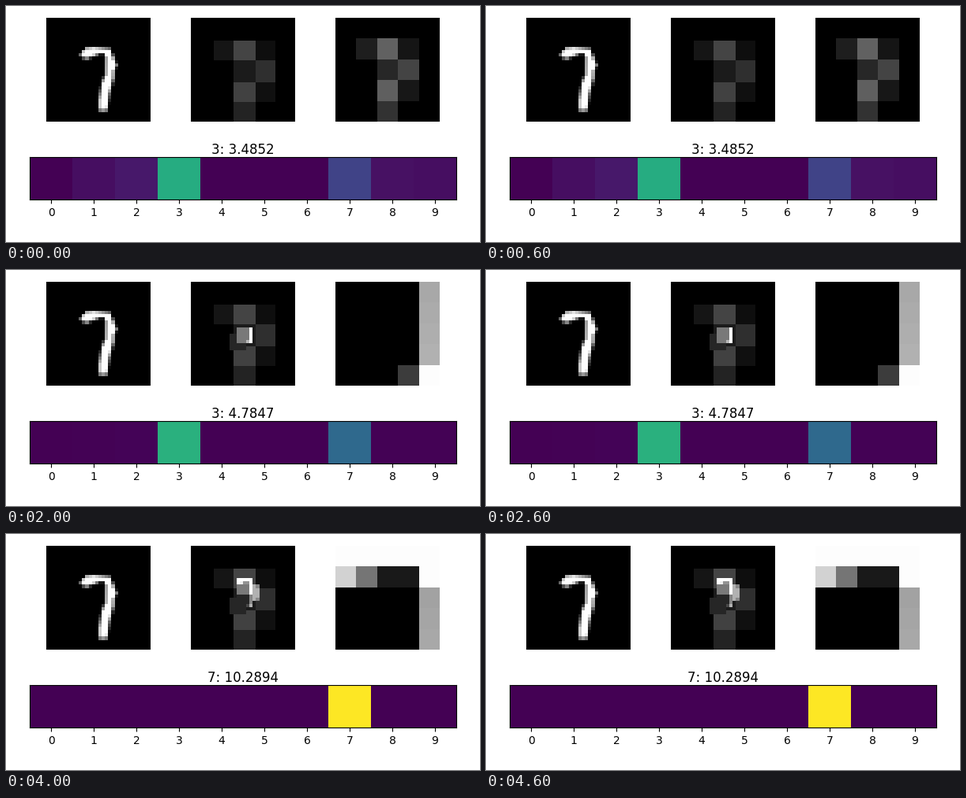
Animation, 600 px wide and 300 px high, one loop 5000 ms. Source, as a matplotlib script:

```python
import numpy as np
import matplotlib.pyplot as plt
from matplotlib.animation import FuncAnimation

SIZE, GLIMPSE = 32, 5
cell = np.arange(SIZE)


def coverage(lo, hi):
    """Share of each unit cell between lo and hi, one row per pair of edges."""
    lo, hi = np.reshape(lo, (-1, 1)), np.reshape(hi, (-1, 1))
    return np.clip(np.minimum(hi, cell + 1) - np.maximum(lo, cell), 0, 1)


def band(start, end, lo, hi):
    """Stroke running along the first axis, its two edges given by key points."""
    def edge(points):
        return np.interp(cell, *zip(*points))
    return coverage(start, end).T * coverage(edge(lo), edge(hi))


def draw_digit():
    bar = band(10, 20,
               [(10, 11.1), (12, 9.3), (14, 9.1), (19, 9.6)],
               [(10, 11.5), (11.5, 12.7), (14, 11.83), (16, 11.1)]).T
    stem = band(10, 28.6,
                [(11, 18), (12, 18.36), (17, 18.3), (18, 17.76), (20, 17), (25, 16.2)],
                [(10, 19.9), (12, 20.7), (14, 21.5), (16, 20.7), (18, 20.65), (23, 19.4), (28, 18.8)])
    return 0.99 * np.maximum(bar, stem)


def window(spot):
    row, col = spot
    return slice(row, row + GLIMPSE), slice(col, col + GLIMPSE)


digit = draw_digit()

# first look: block averages of the whole digit
edges = np.linspace(0, SIZE, GLIMPSE + 1)
blocks = coverage(edges[:-1], edges[1:]) * GLIMPSE / SIZE
coarse = blocks @ digit @ blocks.T
nearest = cell * GLIMPSE // SIZE
backdrop = 0.7 * coarse[np.ix_(nearest, nearest)]

spots = [(16, 12), (14, 14), (12, 16), (10, 14)]  # row, column of each later look

# top score, probability of 3, probability of 7
steps = [(3.4852, .62, .2), (4.8272, .815, .145), (4.7847, .635, .34),
         (7.0356, .025, .955), (10.2894, 0, 1)]


def memory(step):
    """Backdrop with faded past looks and a bright current one."""
    view = backdrop.copy()
    for i, spot in enumerate(spots[:step], start=1):
        area = window(spot)
        if i == step:
            view[area] = 0.48 + digit[area]
        else:
            view[area] = 0.15 + 0.55 * digit[area]
    return view.clip(0, 1)


def scores(step):
    _, three, seven = steps[step]
    row = np.zeros((1, 10))
    row[0, [3, 7]] = three, seven
    row[0, [1, 2, 8, 9]] = (1 - three - seven) * np.array([.2, .35, .25, .2])
    return row


def caption(step):
    score, three, seven = steps[step]
    return f"{3 if three > seven else 7}: {score:.4f}"


fig = plt.figure(figsize=(6, 3), dpi=100, facecolor="white")
grid = fig.add_gridspec(2, 3, left=.05, right=.95, bottom=.05, top=.95,
                        wspace=.05, hspace=.05)


def add_image(place, data, cmap):
    ax = fig.add_subplot(place)
    return ax, ax.imshow(data, cmap=cmap, vmin=0, vmax=1, interpolation="nearest")


panels = [add_image(grid[0, i], data, "gray")
          for i, data in enumerate((digit, backdrop, coarse))]
for ax, _ in panels:
    ax.axis("off")
memory_img, look_img = panels[1][1], panels[2][1]

bar_ax, bar_img = add_image(grid[1, :], scores(0), "viridis")
bar_ax.set_xticks(range(10))
bar_ax.set_yticks([])
title = bar_ax.set_title(caption(0), fontsize=12, pad=1.2)


def update(step):
    memory_img.set_data(memory(step))
    look_img.set_data(digit[window(spots[step - 1])] if step else coarse)
    bar_img.set_data(scores(step))
    title.set_text(caption(step))
    return memory_img, look_img, bar_img, title


anim = FuncAnimation(fig, update, frames=len(steps), interval=1000,
                     repeat=True, repeat_delay=0, blit=False)
plt.show()
```
